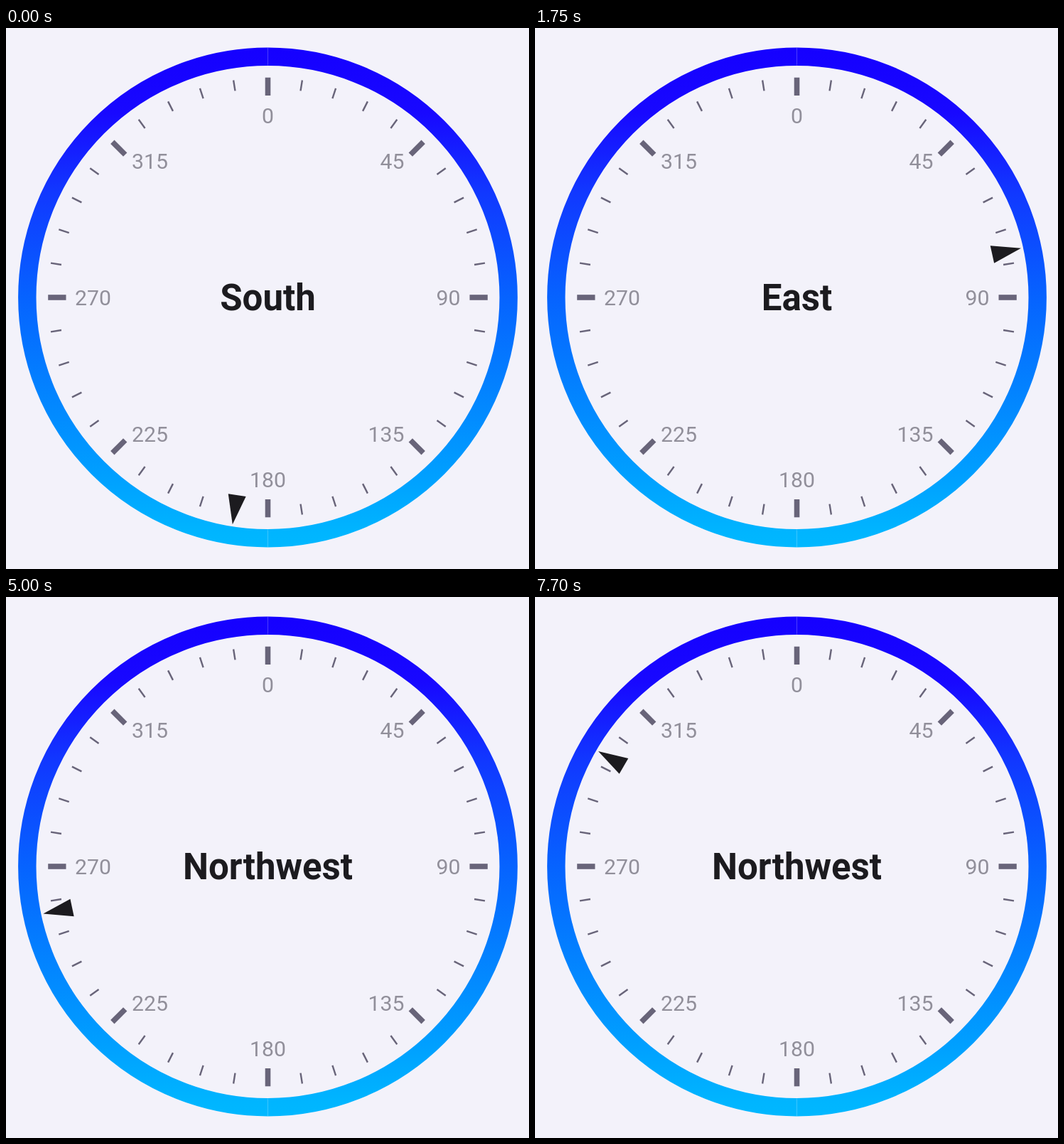
Animation of 736 by 761 pixels, one loop 8 s. Source, as an HTML page:

```html
<!DOCTYPE html>
<html lang="en">
<head>
<meta charset="utf-8">
<title>Compass</title>
<style>
  html, body { margin: 0; width: 100%; height: 100%; overflow: hidden; background: #f3f2fa; }
  svg { display: block; width: 736px; height: 761px; }
  text { font-family: Roboto, sans-serif; text-anchor: middle; }
  .label { font-size: 30.2px; fill: #918f9a; }
  #heading { font-size: 51px; font-weight: 700; fill: #1c1b1f; }
  .tick { stroke: #686479; }
</style>
</head>
<body>
<svg viewBox="0 0 736 761">
  <defs>
    <linearGradient id="sky" gradientUnits="userSpaceOnUse" x1="0" y1="27" x2="0" y2="731">
      <stop offset="0" stop-color="#1500ff"/>
      <stop offset=".13" stop-color="#1808ff"/>
      <stop offset=".29" stop-color="#1138ff"/>
      <stop offset=".5" stop-color="#0663ff"/>
      <stop offset=".854" stop-color="#009fff"/>
      <stop offset=".97" stop-color="#00b5ff"/>
      <stop offset="1" stop-color="#00b8ff"/>
    </linearGradient>
  </defs>
  <circle cx="368.5" cy="379" r="338.7" fill="none" stroke="url(#sky)" stroke-width="25.4"/>
  <path d="M368.5 27.5V52.5M368.5 705.5V730.5" stroke="#fff" stroke-opacity=".3" stroke-width=".8"/>
  <g id="dial"></g>
  <text id="heading" x="368.5" y="396.5"></text>
  <g transform="translate(368.5 379)">
    <path id="pointer" d="M0-323L12.6-281.5H-12.6Z" fill="#1c1b1f"/>
  </g>
</svg>
<script>
const CX = 368.5, CY = 379, LOOP = 8000, STEP = 50;
const dial = document.getElementById('dial');
const heading = document.getElementById('heading');
const pointer = document.getElementById('pointer');

function add(tag, attrs, text = '') {
  const el = document.createElementNS('http://www.w3.org/2000/svg', tag);
  for (const key in attrs) el.setAttribute(key, attrs[key]);
  el.textContent = text;
  dial.append(el);
}

for (let angle = 0; angle < 360; angle += 9) {
  const major = angle % 45 === 0;
  add('line', {
    class: 'tick', x1: CX, x2: CX, y1: CY - 309.3, y2: CY - (major ? 284 : 294.2),
    'stroke-width': major ? 7.6 : 2.4, transform: `rotate(${angle} ${CX} ${CY})`
  });
}

const labels = [
  [0, 368.5, 123], [45, 543.5, 187], [90, 622.5, 379], [135, 535, 571],
  [180, 368.5, 635], [225, 202.5, 571], [270, 122.5, 379], [315, 202.5, 187]
];
for (const [value, x, y] of labels) add('text', { class: 'label', x, y: y + 10.7 }, value);

function bezier(x1, y1, x2, y2) {
  const at = (u, a, b) => 3 * u * (1 - u) ** 2 * a + 3 * u * u * (1 - u) * b + u ** 3;
  return x => {
    let lo = 0, hi = 1;
    for (let i = 0; i < 24; i++) {
      const mid = (lo + hi) / 2;
      if (at(mid, x1, x2) < x) lo = mid; else hi = mid;
    }
    return at((lo + hi) / 2, y1, y2);
  };
}

const ease = bezier(.25, .1, .25, 1);
const slowStart = bezier(.6, 0, .5, 1);

const moves = [
  { start: 550, length: 1000, to: 77.6, name: 'East', curve: ease },
  { start: 2600, length: 1000, to: 236.1, name: 'Southwest', curve: ease },
  { start: 4600, length: 900, to: 307.2, name: 'Northwest', curve: slowStart },
  { start: 6550, length: 1000, to: 300.1, name: 'Northwest', curve: ease }
];

function draw(time) {
  let angle = 188.85, name = 'South';
  for (const move of moves) {
    const passed = time - move.start;
    if (passed < 0 || (passed === 0 && move.curve === ease)) break;
    angle += (move.to - angle) * move.curve(Math.min(1, passed / move.length));
    name = move.name;
  }
  pointer.setAttribute('transform', `rotate(${angle.toFixed(2)})`);
  if (heading.textContent !== name) heading.textContent = name;
}

const origin = performance.now();
function tick() {
  const elapsed = (performance.now() - origin) % LOOP;
  draw(Math.floor(elapsed / STEP) * STEP);
  requestAnimationFrame(tick);
}
tick();
</script>
</body>
</html>
```
